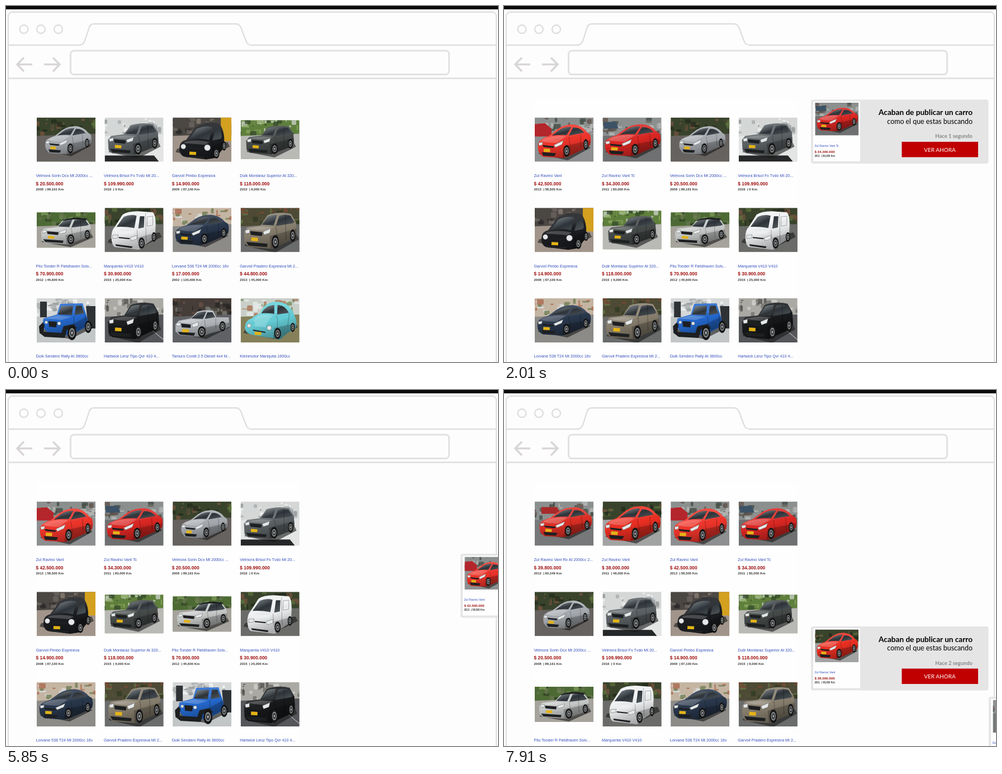
An HTML page that plays this animation: 880 px wide and 637 px high, repeating every 8 s.

```html
<!DOCTYPE html>
<html lang="es">
<head>
<meta charset="utf-8">
<title>Carros</title>
<style>
html, body { margin: 0; width: 880px; height: 637px; overflow: hidden; background: #fdfdfd; }
svg { display: block; }
.item { font-family: "Liberation Sans", Arial, sans-serif; text-anchor: start; }
.name { font-size: 7.1px; fill: #3550bd; }
.price { font-size: 8.4px; font-weight: 700; fill: #a01515; }
.info { font-size: 6px; font-weight: 700; fill: #3a3a3a; white-space: pre; }
.card { font-family: Lato, Carlito, sans-serif; }
.head, .sub, .ago { text-anchor: end; }
.head { font-size: 13.6px; font-weight: 700; }
.sub { font-size: 12.4px; }
.ago { font-size: 9.4px; font-weight: 700; fill: #858585; }
.btn { font-size: 10px; fill: #fff; text-anchor: middle; }
.chrome { fill: none; stroke: #dfdddd; stroke-width: 2.3; }
.grid, .card { animation: 8s step-end infinite; }

#grid1 { animation-name: fade1; }
#grid2 { animation-name: fade2; }
#grid3 { animation-name: fade3; }
#grid4 { animation-name: fade4; }
@keyframes fade1 {
  0% { opacity: 0; } 6.25% { opacity: .25; } 8.375% { opacity: .5; }
  10.125% { opacity: .75; } 11.625%, 100% { opacity: 1; }
}
@keyframes fade2 {
  0% { opacity: 0; }
  20.625% { opacity: 0; animation-timing-function: steps(4, start); }
  26.625%, 100% { opacity: 1; }
}
@keyframes fade3 {
  0% { opacity: 0; }
  74.625% { opacity: 0; animation-timing-function: steps(4, start); }
  80.625%, 100% { opacity: 1; }
}
@keyframes fade4 {
  0% { opacity: 0; }
  92.875% { opacity: 0; animation-timing-function: steps(4, start); }
  98.875%, 100% { opacity: 1; }
}

#card1 { animation-name: slide1; }
#card2 { animation-name: slide2; }
#card3 { animation-name: slide3; }
#card4 { animation-name: slide4; }
@keyframes slide1 {
  0% { transform: translateX(397px); }
  13.125% { transform: translateX(397px); animation-timing-function: steps(5, start); }
  20.625% { transform: translateX(0); }
  56.375% { transform: translateX(6px); animation-timing-function: steps(5, start); }
  63.875%, 100% { transform: translateX(403px); }
}
@keyframes slide2 {
  0% { transform: translateX(397px); }
  26.625% { transform: translateX(397px); animation-timing-function: steps(5, start); }
  34.125% { transform: translateX(0); }
  68.625% { transform: translateX(-53px); animation-timing-function: steps(5, start); }
  76.125%, 100% { transform: translateX(343px); }
}
@keyframes slide3 {
  0% { transform: translateX(397px); }
  79.125% { transform: translateX(397px); animation-timing-function: steps(5, start); }
  86.625%, 100% { transform: translateX(0); }
}
@keyframes slide4 {
  0% { transform: translateX(397px); }
  98.875%, 100% { transform: translateX(318px); }
}
</style>
</head>
<body>
<svg width="880" height="637" viewBox="0 0 880 637">
  <defs>
    <linearGradient id="sheen" x1="0" y1="0" x2=".35" y2="1">
      <stop offset="0" stop-color="#fff" stop-opacity=".12"/>
      <stop offset=".45" stop-color="#fff" stop-opacity=".1"/>
      <stop offset=".6" stop-color="#000" stop-opacity=".02"/>
      <stop offset="1" stop-color="#000" stop-opacity=".28"/>
    </linearGradient>
    <linearGradient id="pane" x1="0" y1="0" x2="1" y2="1">
      <stop offset="0" stop-color="#8b9498"/>
      <stop offset=".5" stop-color="#2d3338"/>
      <stop offset="1" stop-color="#50585c"/>
    </linearGradient>
    <g id="items"></g>
  </defs>
  <rect width="880" height="637" fill="#fdfdfd"/>
  <rect width="880" height="6" fill="#0b0809"/>
  <g class="chrome">
    <rect x="4" y="11" width="873" height="660" rx="7" stroke-width="2"/>
    <path d="M4 70H130Q138 70 141 62L149 38Q151 32 157 32H411Q417 32 420 38L430 64Q432 70 440 70H877"/>
    <path d="M4 129.5H877"/>
    <circle cx="32" cy="41.5" r="7.5"/>
    <circle cx="62.5" cy="41.5" r="7.5"/>
    <circle cx="93.5" cy="41.5" r="7.5"/>
    <rect x="115.5" y="80" width="677" height="42.5" rx="6" stroke-width="3" stroke="#e3e1e1"/>
    <path d="M20 104.5H47M32 92.5L20 104.5L32 117M68 104.5H96M84 92.5L96 104.5L84 117" stroke-width="3.6" stroke="#d9d6d6"/>
  </g>
  <g id="stage"></g>
</svg>
<script>
// Every car is drawn in a 105 x 79 photo: outline, lit hood, shaded side, door seams and fittings.
const round = (x, y, r) => `M${x - r} ${y}a${r} ${r} 0 1 0 ${2 * r} 0a${r} ${r} 0 1 0 ${-2 * r} 0Z`;
const shapes = {
  coupe: {
    body: 'M4 44Q7 37 24 32L42 19Q54 12 70 12Q86 13 96 25L102 29Q105 38 102 47L92 53L62 66L50 69L14 67Q4 62 4 52Z',
    glass: 'M30 31L46 20Q56 15 67 16L58 30Q44 29 30 31ZM62 31L70 17Q84 17 91 26Q78 28 62 31Z',
    hood: 'M10 40Q14 35 26 33Q42 30 57 32L40 43Q24 44 10 40Z',
    side: 'M52 49L102 39L102 47L92 53L62 66L50 69Z',
    seam: 'M62 33L66 56M84 29L85 51',
    lamp: 'M5 43L13 42L12 47L6 48ZM34 47L52 39L49 46L37 51Z',
    dark: 'M13 47L34 49L33 52L14 50ZM11 59L38 61L35 66L14 65Z',
    plate: [15, 53], wheels: [[58, 57, 6, 10], [94, 46, 4.5, 9]]
  },
  suv: {
    body: 'M4 40L10 33L34 30L46 14Q66 8 88 12L97 26L98 44L92 52L66 62L54 67L12 64L5 58Z',
    glass: 'M36 29L47 16Q56 13 63 14L57 30ZM61 31L67 15Q80 12 87 15L94 25L90 27Z',
    hood: 'M10 35L34 32L58 33L40 39Q24 38 10 35Z',
    side: 'M50 47L98 35L98 44L92 52L66 62L52 67Z',
    seam: 'M61 32L64 56M78 13L79 53',
    lamp: 'M6 38L14 36L14 42L7 43ZM38 40L52 35L50 42L40 45Z',
    dark: 'M15 39L37 41L36 47L16 45ZM8 56L46 59L45 64L12 62Z',
    plate: [17, 49], wheels: [[60, 56, 6.5, 10.5], [91, 46, 5, 9.5]]
  },
  hatch: {
    body: 'M12 54Q13 42 24 40L40 18Q62 6 82 11Q90 16 92 36L92 52L78 72L60 75L20 70Q11 66 12 54Z',
    glass: 'M29 39L42 21Q56 14 71 17L65 40Q46 36 29 39ZM71 41L77 17Q86 17 88 34L86 38Z',
    hood: 'M19 46Q24 42 30 42Q50 40 66 44L58 49Q36 47 19 46Z',
    side: 'M70 52L92 42L92 52L78 72L68 74Z',
    seam: 'M70 42L73 60',
    lamp: round(19, 52, 4.5) + round(62, 54, 5.5),
    dark: 'M26 53L54 55L53 58L27 56ZM22 67L58 70L56 73L24 71Z',
    plate: [30, 61], wheels: [[78, 64, 5.5, 9.5], [92, 51, 3.5, 8]]
  },
  van: {
    body: 'M12 52Q12 40 18 34L32 12Q40 6 60 6L86 8Q91 12 91 30L90 54L72 66L62 75L18 70Q12 66 12 52Z',
    glass: 'M21 34L34 16Q46 11 57 14L53 36Q36 33 21 34ZM60 37L63 15L71 15L70 35Z',
    hood: 'M17 40L54 42L50 48L16 46Z',
    side: 'M60 53L90 45L90 54L72 66L62 75Z',
    seam: 'M58 39L59 62M73 10L74 60M76 16L86 15L86 31L76 33Z',
    lamp: 'M14 49L24 48L23 54L14 55ZM46 53L58 49L57 56L47 59Z',
    dark: 'M25 52L45 54L44 56L25 54ZM19 65L50 69L48 72L20 68Z',
    wheels: [[66, 63, 5.5, 10], [88, 52, 4, 8.5]]
  },
  pickup: {
    body: 'M5 46L11 40L32 36L44 24Q56 20 72 22L78 34L100 34L102 50L92 56L66 63L52 69L12 66L5 60Z',
    glass: 'M33 36L45 26Q54 23 60 24L54 37ZM57 37L62 25L71 25L76 34Z',
    hood: 'M11 42L32 38L54 40L40 45Q24 44 11 42Z',
    side: 'M46 55L102 43V50L92 56L66 63L50 69Z',
    seam: 'M57 39L59 57M77 35V54',
    lamp: 'M6 45L14 43L14 49L7 50ZM34 47L46 42L45 50L36 52Z',
    dark: 'M15 45L32 47L32 53L16 52ZM9 60L40 62L38 67L13 65Z',
    plate: [17, 55], wheels: [[52, 60, 7, 10], [89, 50, 5.5, 9]]
  },
  jeep: {
    body: 'M12 36L36 29L42 10L82 9L88 28L94 48L72 60L56 66L20 62L10 50Z',
    glass: 'M38 29L44 14L65 13L63 30ZM68 30L70 13L80 13L85 27Z',
    hood: 'M16 36L37 31L63 33L44 39Z',
    side: 'M66 45L89 33L94 48L72 58Z',
    seam: 'M66 32L67 50M86 30L87 42',
    lamp: round(17, 43, 2.6) + round(40, 45, 3),
    dark: 'M21 41L36 42L35 52L22 51ZM4 50L11 43L14 48L12 60L44 62L48 50L66 46L72 54L54 56L50 71L14 69L5 62Z',
    wheels: [[63, 62, 8, 13], [92, 51, 6, 11]]
  },
  beetle: {
    body: 'M8 56Q6 40 20 36Q28 28 34 28Q42 6 66 6Q88 8 96 30Q102 44 98 54L84 62L70 74L24 66Q10 64 8 56Z',
    glass: 'M37 27Q44 13 60 12L60 28Q46 26 37 27ZM65 29L66 12Q79 12 86 26Z',
    hood: 'M22 40Q30 30 38 30Q50 29 58 32Q48 38 44 52L24 50Q28 42 22 40Z',
    side: 'M60 53L98 45L98 54L84 62L70 74L58 72Z',
    seam: 'M64 31Q68 46 64 56M87 27L84 50',
    lamp: round(15, 49, 3.5) + round(51, 53, 4),
    dark: 'M22 56L44 60L44 62L22 58Z',
    plate: [25, 60], wheels: [[66, 63, 6, 10], [93, 52, 4, 8]]
  }
};

// far: background tones, the first as base; ground: floor; behind / over: extra parts.
const red = '#ee2f22';
const street = ['#8b908f', '#3f4a40', '#b9bbb8', '#5f5048'];
const trees = ['#39432c', '#20281b', '#5d713d', '#76533f'];
const hall = ['#d5d7d7', '#f4f4f4', '#a6aaab', '#8b8f90'];
const cars = [
  { name: 'Zul Ravino Vant Rx At 2000cc 2...', price: '39.800.000', info: '2012  | 60,349 Km', shape: 'coupe', paint: '#e02f25',
    at: 'translate(5 -1) scale(.94)', far: street, ground: '#77787a', behind: '<path d="M12 10h28l6 12h-34z" fill="#a82a2a"/>' },
  { name: 'Zul Ravino Vant', price: '38.000.000', info: '2011  | 48,000 Km', shape: 'coupe', paint: red,
    at: 'translate(0 -5) scale(1 1.1)', far: trees, ground: '#a2a3a3' },
  { name: 'Zul Ravino Vant', price: '42.500.000', info: '2013  | 58,500 Km', shape: 'coupe', paint: '#f2352b',
    at: 'translate(2 0) scale(.95 1.05)', far: street, ground: '#8d8f90', behind: '<path d="M0 12L18 10L30 20V34H0z" fill="#b3262b"/>' },
  { name: 'Zul Ravino Vant Tc', price: '34.300.000', info: '2011  | 80,000 Km', shape: 'coupe', paint: '#de2723',
    at: '', far: street, ground: '#6f7071', behind: '<path d="M2 8h22l4 12H2z" fill="#3c5266"/>' },
  { name: 'Velmora Sorin Dcx Mt 2000cc ...', price: '20.500.000', info: '2008  | 89,161 Km', shape: 'coupe', paint: '#a9adb2',
    at: 'translate(12 5) scale(.83 .88)', far: trees, ground: '#66625f' },
  { name: 'Velmora Brisol Fx Tvdo Mt 20...', price: '109.990.000', info: '2016  | 0 Km', shape: 'suv', paint: '#5d6366',
    at: 'translate(2 0) scale(.96 1)', far: hall, ground: '#e3e4e4', behind: '<path d="M0 68H88L97 79H0z" fill="#262728"/>' },
  { name: 'Garvoil Pimbo Expresiva', price: '14.900.000', info: '2008  | 87,100 Km', shape: 'hatch', paint: '#1c1e22',
    at: '', far: ['#4b4743', '#2b2a2a', '#6d6660', '#8b8076'], ground: '#a1948a', behind: '<path d="M86 0h19v42h-19z" fill="#d3a01f"/>' },
  { name: 'Dulk Montaraz Superior At 320...', price: '118.000.000', info: '2015  | 9,000 Km', shape: 'suv', paint: '#474c4b',
    at: 'translate(6 5) scale(.91)', far: ['#5f7f3c', '#34492a', '#8ba85f', '#cdd5cc'], ground: '#b9b9b6', h: 69 },
  { name: 'Pilu Tonder R Fieldhaven Solv...', price: '70.900.000', info: '2012  | 45,600 Km', shape: 'suv', paint: '#c9cccb',
    at: 'translate(4 9) scale(.95 .84)', far: ['#4d6a34', '#2d3e23', '#7e9a58', '#687650'], ground: '#a5a39b', h: 63,
    over: '<path d="M45 15Q66 7 88 12L90 16Q66 11 44 17z" fill="#1c1e1f"/>' },
  { name: 'Marquenta V410 V410', price: '30.900.000', info: '2015  | 25,000 Km', shape: 'van', paint: '#eff1f2',
    at: '', far: trees, ground: '#6b6b69' },
  { name: 'Lorvane 538 T24 Mt 2000cc 16v', price: '17.000.000', info: '2002  | 130,000 Km', shape: 'coupe', paint: '#29374c',
    at: 'translate(1 1) scale(.96 .95)', far: ['#c4b5a3', '#dfe3e6', '#6a7a4e', '#a9654a'], ground: '#8c8b88' },
  { name: 'Garvoil Pradero Expresiva Mt 2...', price: '44.800.000', info: '2013  | 45,000 Km', shape: 'suv', paint: '#89806f',
    at: 'translate(2 -3) scale(1 1.14)', far: ['#4d4a35', '#7a4935', '#303a23', '#65794a'], ground: '#6a6b6b' },
  { name: 'Dulk Sendero Rally At 3600cc', price: '92.000.000', info: '2014  | 30,000 Km', shape: 'jeep', paint: '#2469cf',
    at: '', far: hall, ground: '#c3c6c7', behind: '<path d="M6 6h12v28H6zM88 14h17v40H92z" fill="#2e3235"/>' },
  { name: 'Hartwick Lenz Tipo Qvr 410 4...', price: '165.000.000', info: '2016  | 5,000 Km', shape: 'suv', paint: '#17191b',
    at: 'translate(2 -4) scale(.97 1.15)', far: ['#aaa9a3', '#6e6e69', '#d0cfca', '#4e4e4b'], ground: '#55565a',
    behind: '<path d="M76 50L105 74" stroke="#ddd" fill="none"/>' },
  { name: 'Tamuro Cordil 2.5 Diesel 4x4 M...', price: '58.000.000', info: '2012  | 70,000 Km', shape: 'pickup', paint: '#b6babf',
    at: '', far: ['#453d38', '#272625', '#6b5046', '#7c8177'], ground: '#5f6164' },
  { name: 'Kleinmotor Mariquita 1600cc', price: '16.000.000', info: '1968  | 90,000 Km', shape: 'beetle', paint: '#66d0d9',
    at: '', far: ['#c9cfc8', '#a86c4d', '#718756', '#e9eced'], ground: '#85805a' }
];

function random(seed) {
  return () => (seed = (seed * 16807) % 2147483647) / 2147483647;
}

function wheel([x, y, rx, ry]) {
  const oval = (k, fill) => `<ellipse cx="${x}" cy="${y}" rx="${rx * k}" ry="${ry * k}" fill="${fill}"/>`;
  return oval(1, '#161616') + oval(.64, '#8d9092') + oval(.46, '#3a3c3e') + oval(.18, '#b5b7b8');
}

function photo(car, i) {
  const s = shapes[car.shape], h = car.h || 79, top = (79 - h) / 2, rnd = random(i * 911 + 77);
  let blobs = '';
  for (let k = 0; k < 40; k++) {
    blobs += `<rect x="${rnd() * 110 - 8}" y="${rnd() * 28}" width="${2 + rnd() * 11}" height="${2 + rnd() * 9}" rx="2" fill="${car.far[k % 4]}" opacity=".75"/>`;
  }
  const plate = s.plate ? `<rect x="${s.plate[0]}" y="${s.plate[1]}" width="12" height="5.5" fill="#e3b318" transform="rotate(3 ${s.plate})"/>` : '';
  return `<svg y="${top}" width="105" height="${h}" viewBox="0 ${top} 105 ${h}">
    <rect width="105" height="79" fill="${car.far[0]}"/>${blobs}
    <path d="M0 33L105 29V79H0z" fill="${car.ground}"/>${car.behind || ''}
    <g transform="${car.at}">
      <path d="M5 62L60 73L102 52L98 44L8 56z" fill="#1a1a1a" opacity=".6"/>
      ${wheel(s.wheels[1])}
      <path d="${s.body}" fill="${car.paint}"/><path d="${s.body}" fill="url(#sheen)"/>
      <path d="${s.hood}" fill="#fff" opacity=".2"/>
      <path d="${s.side}" opacity=".22"/>
      <path d="${s.glass}" fill="url(#pane)"/>
      <path d="${s.seam}" fill="none" stroke="#000" stroke-width=".6" opacity=".5"/>
      <path d="${s.dark}" fill="#1d1f21"/>
      <path d="${s.lamp}" fill="#e4e8e8" stroke="#555" stroke-width=".5"/>
      ${plate}${s.wheels.map(wheel).join('')}${car.over || ''}
    </g></svg>`;
}

const item = (car, i) => `<g id="car${i}" class="item">${photo(car, i)}
  <text class="name" x="-1.5" y="106.5">${car.name}</text>
  <text class="price" x="-1.5" y="121">$ ${car.price}</text>
  <text class="info" x="-1.5" y="130.5">${car.info}</text></g>`;

// Each new grid starts one car earlier in the list.
function grid(n) {
  let out = n ? '<rect x="53" y="167" width="473" height="470" fill="#fefefe"/>' : '';
  for (let k = 0; k < 12; k++) {
    out += `<use href="#car${4 - n + k}" x="${55 + (k % 4) * 121.6}" y="${199.5 + Math.floor(k / 4) * 161.7}"/>`;
  }
  return `<g id="grid${n}" class="grid">${out}</g>`;
}

const card = (n, y, ago) => `<g id="card${n}" class="card"><g transform="translate(549 ${y})">
  <rect width="317.5" height="114.5" rx="4" fill="#e5e5e5"/>
  <rect x="4" y="3.5" width="84" height="107" fill="#fefefe"/>
  <use href="#car${4 - n}" transform="translate(7.5 5.5) scale(.74)"/>
  <text class="head" x="289" y="27.5">Acaban de publicar un carro</text>
  <text class="sub" x="289" y="43">como el que estas buscando</text>
  <text class="ago" x="289" y="68.5">Hace ${ago}</text>
  <rect x="162.5" y="75.5" width="136.5" height="27.5" fill="#c00000"/>
  <text class="btn" x="230.5" y="93">VER AHORA</text></g></g>`;

document.getElementById('items').innerHTML = cars.map(item).join('');
document.getElementById('stage').innerHTML =
  [0, 1, 2, 3, 4].map(grid).join('') +
  card(1, 167.5, '1 segundo') + card(2, 293, '0,5 segundos') +
  card(3, 423, '2 segundo') + card(4, 549, '1 segundo');
</script>
</body>
</html>
```
